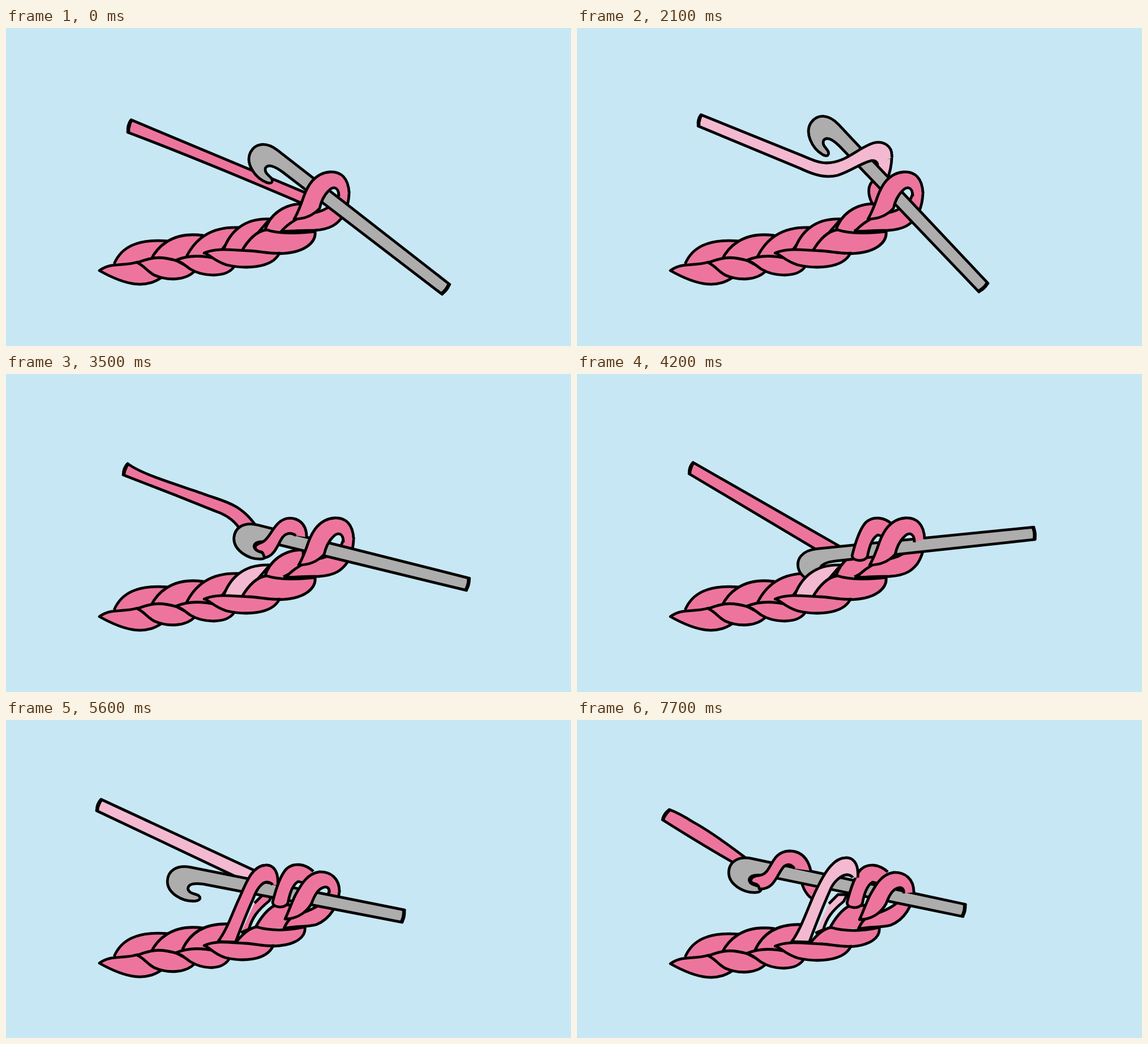
Recreate the animation shown at these times as an HTML page. Size 998x561 px, loop 8 s.

```html
<!DOCTYPE html>
<html lang="en">
<head>
<meta charset="utf-8">
<title>Crochet stitch</title>
<style>
html, body { margin: 0; width: 100%; height: 100%; overflow: hidden; background: #c7e7f4; }
svg { display: block; width: 100%; height: 100%; }
path { stroke: #000; stroke-width: 4.8; stroke-linejoin: round; }
.cap { stroke-width: 6.5; fill: none; }
</style>
</head>
<body>
<svg id="stage" viewBox="0 0 998 561"></svg>
<script>
const PINK = '#ed759d', LIGHT = '#f3b9d0', GREY = '#aeadad';
const STEP = 700, LOOP = 8000;

// Open paths are filled whole, but their closing edge gets no outline.
const shape = (d, fill = PINK) => `<path d="${d}" fill="${fill}"/>`;
const move = (x, y, s) => `<g transform="translate(${x} ${y})">${s}</g>`;

// Yarn tail with a dark cut end between (x1,y1) and (x2,y2).
const yarn = (fill, top, x1, y1, x2, y2, bottom) =>
  shape(`M${top} ${x1},${y1}L${x2},${y2}${bottom}`, fill) +
  `<path class="cap" d="M${x1},${y1 + 1}Q${(x1 + x2) / 2 - 3},${(y1 + y2) / 2 - 1} ${x2 + 1},${y2 - 1}"/>`;

// Hook placed by the middle of its handle end.
const hook = (x, y, angle) =>
  `<g transform="translate(${x} ${y}) rotate(${angle})">` +
  shape('M0,-11L-385,-13C-412,-13 -424,2 -421,19C-417,40 -388,50 -366,44C-357,41 -357,36 -363,33C-369,31 -379,34 -383,25C-384,16 -372,12 -352,12L0,11Z', GREY) +
  '<path class="cap" d="M-1,-10Q2,0 -1,10"/></g>';

const lobeA = shape('M191,416C203,388 230,371 287,376L290,410');
const lobeB = shape('M256,409C265,390 290,358 348,366L340,405');

const lowerRow = (cEnd, dEnd, e) => {
  const w = dEnd - 350, dx = k => 350 + w * k;
  return e +
    shape('M165,428C185,413 205,421 232,413L275,440C248,459 215,456 165,428Z') +
    shape('M232,414C262,402 278,404 300,410L334,428C318,446 285,446 262,436C250,430 245,420 232,414Z') +
    shape(`M299,410C325,399 350,402 374,407L${cEnd},421C${cEnd - 13},440 350,440 325,425C315,418 310,412 299,410Z`) +
    shape(`M350,397C${dx(.15)},388 ${dx(.3)},391 ${dx(.6)},393C${dx(.75)},394 ${dx(.9)},399 ${dEnd},397C${dx(.9)},425 ${dx(.53)},425 ${dx(.3)},418C${dx(.11)},410 ${dx(.09)},400 350,397Z`);
};

// First half: one loop on the hook.
function single({ dx = 0, back = '', tool, front = '', stitch = PINK, through = false }) {
  const d = shape('M384,392C395,360 420,335 466,337L420,390', stitch);
  const e = shape('M457,358C465,330 490,310 525,310L525,340L490,358') +
    move(dx, 0, shape('M588,288C588,305 570,322 540,327C520,331 498,345 486,359C510,358 530,357 545,357C575,355 585,345 593,335C603,320 606,305 606,288'));
  return back + lobeA + lobeB + shape('M318,405C330,380 355,350 410,352L375,400') +
    (through ? e + tool + d : d + e + tool) + front +
    move(dx, 0, shape('M606,291C605,265 592,253 572,254C545,256 533,278 526,297C521,312 516,325 509,337C530,337 545,328 554,318C557,305 562,295 569,288C578,278 588,280 588,297')) +
    lowerRow(403, 483, shape('M416,394C430,370 445,358 460,356C485,364 515,362 546,359C548,378 528,397 483,398C460,403 435,403 416,394'));
}

const wrapLoop = shape('M540,266C525,252 505,250 492,262C480,275 473,300 468,320C468,331 490,332 495,322C498,305 503,290 513,284L522,286');

// Pulled-up loop with its base at b and its top at (x,y).
function pulled(fill, b, x, y) {
  const m = b + (x - b) * .43;
  return shape(
    `M${x + 22},${y + 35}C${x + 24},${y + 8} ${x + 12},${y - 1} ${x},${y}C${x - 25},${y + 1} ${m + 12},${y + 37} ${m},${y + 62}` +
    `C${m - 12},${y + 88} ${b + 16},370 ${b},391L${b + 31},392C${b + 43},360 ${m + 16},${y + 82} ${m + 26},${y + 60}` +
    `C${m + 33},${y + 40} ${x - 5},${y + 30} ${x + 3},${y + 30}Q${x + 11},${y + 31} ${x + 13},${y + 35}`, fill);
}

// Second half: three loops on the hook.
function triple({ dx = 0, dy = 0, back = '', tool, front = '', fill = PINK, top }) {
  return back + move(0, dy, lobeA + lobeB) +
    move(dx / 2, dy, shape('M310,404C322,378 345,356 395,359L375,404')) +
    move(dx, dy,
      shape('M436,322L452,306L468,306L462,318C440,336 432,348 426,368L412,374', fill) +
      shape('M436,368C448,345 460,332 472,326L500,325L505,345L488,366') +
      shape('M568,300C565,318 545,332 515,341C500,345 493,355 488,367C505,362 525,365 545,360C570,350 584,325 586,300')) +
    tool + front +
    move(dx, dy,
      wrapLoop +
      shape('M586,302C586,278 570,266 550,267C528,270 517,292 508,308C500,325 495,340 490,350C515,350 530,335 537,322C542,308 548,298 556,295C565,291 569,297 568,304')) +
    pulled(fill, 372 + dx * .8, ...top) +
    move(0, dy, lowerRow(391 + dx, 466 + 2 * dx,
      move(dx, 0, shape('M400,395C412,380 425,366 440,364C465,372 500,370 525,364C527,380 512,397 468,398C445,403 420,403 400,395'))));
}

// Yarn laid over the hook.
const overBack = shape('M531,238L556,226C556,245 552,255 546,274L531,262', LIGHT);
const overFront = yarn(LIGHT,
  '556,228C558,208 541,198 523,203C495,212 475,238 440,238C425,238 410,230 395,224L',
  219, 153, 214, 173,
  'L395,248C420,260 440,265 460,260C485,252 500,239 520,234Q531,233 531,243');
const bump = shape('M545,265C518,260 506,285 524,314L548,300');
const secondOver = yarn(LIGHT,
  '416,272C412,252 400,243 385,243C360,243 355,265 333,265C317,264 305,252 290,243L',
  156, 159, 146, 177,
  'L290,265C312,281 327,293 352,292C374,290 376,264 390,262Q397,262 397,268');

const scenes = [
  single({
    back: yarn(PINK, '530,291L', 221, 162, 215, 184, 'Q340,231 520,308'),
    tool: hook(777, 461, 37.6)
  }),
  single({
    back: yarn(LIGHT, '535,284L', 219, 156, 214, 176, 'L440,269L470,275L533,286'),
    tool: hook(810, 337, 8)
  }),
  single({
    dx: 2, back: move(0, 6, overBack),
    tool: hook(774, 447, 35.1), front: move(0, 4, overFront)
  }),
  single({
    dx: 5, back: bump + overBack,
    tool: hook(718, 458, 46.4), front: overFront
  }),
  single({
    dx: 6, back: bump + move(-3, 4, overBack),
    tool: hook(769, 443, 34.5), front: move(-3, 2, overFront)
  }),
  single({
    dx: 8, stitch: LIGHT,
    back: yarn(PINK, '443,270C415,228 385,225 350,212S240,178', 215, 158, 207, 178, 'L300,214L370,242Q400,252 414,275'),
    tool: hook(816, 371, 13.8),
    front: shape('M531,288C531,262 514,252 495,255C470,262 468,294 447,299C435,304 440,312 452,314C455,317 455,321 457,324C473,322 479,304 486,292C492,281 502,278 512,285')
  }),
  single({
    dx: 8, stitch: LIGHT, through: true,
    back: yarn(PINK, '478,312L', 205, 156, 198, 176, 'L440,320'),
    tool: hook(808, 281, -6), front: move(18, 0, wrapLoop)
  }),
  triple({
    fill: LIGHT, top: [455, 254],
    back: yarn(PINK, '438,264Q300,208', 167, 151, 160, 169, 'Q290,229 418,282'),
    tool: hook(782, 340, 6.7)
  }),
  triple({
    dx: 3, dy: 1, top: [458, 256],
    back: yarn(LIGHT, '440,266L', 168, 140, 160, 160, 'L418,282'),
    tool: hook(702, 346, 11)
  }),
  triple({
    dx: 5, dy: 2, top: [460, 259],
    tool: hook(681, 357, 15.2), front: secondOver
  }),
  triple({
    dx: 7, dy: 2, top: [465, 254],
    tool: hook(683, 347, 13), front: move(2, -2, secondOver)
  }),
  triple({
    dx: 9, dy: 2, fill: LIGHT, top: [474, 243],
    back: yarn(PINK, '299,244C270,222 235,196 205,180Q180,164', 163, 158, 151, 176, 'Q224,222 277,252') +
      shape('M396,284Q403,312 424,320L436,296'),
    tool: hook(684, 336, 11.8),
    front: shape('M413,266C407,240 393,231 375,231C340,233 346,270 323,274C304,275 303,288 315,289C322,291 321,295 322,298C350,300 354,269 366,258Q376,251 384,262')
  })
];

const stage = document.getElementById('stage');
const start = performance.now();
let shown = -1;

function draw() {
  const step = Math.floor(((performance.now() - start) % LOOP) / STEP);
  if (step !== shown) stage.innerHTML = scenes[shown = step];
  requestAnimationFrame(draw);
}
draw();
</script>
</body>
</html>
```
